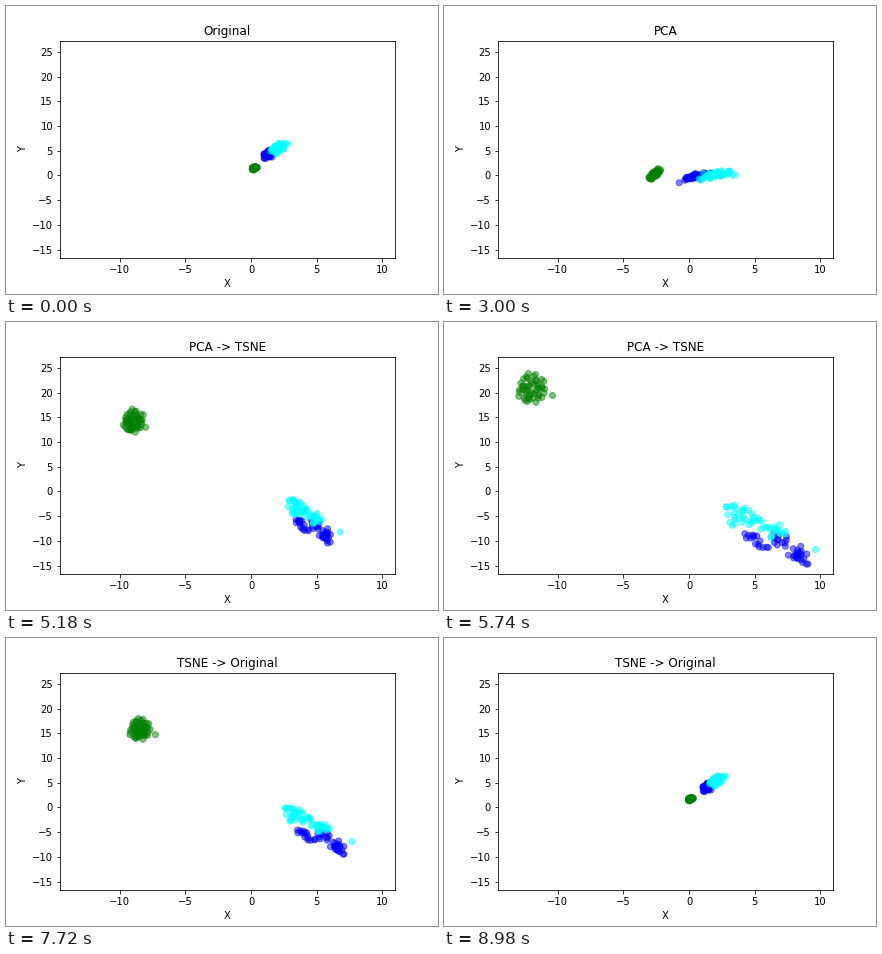
Write a matplotlib script that moves like this. It is 432x288 px and loops after 9 s.

```python
import matplotlib.pyplot as plt
import numpy as np
from matplotlib.animation import FuncAnimation

plt.rcParams.update({"font.family": "DejaVu Sans", "font.size": 10,
                     "figure.subplot.bottom": 0.125})

rng = np.random.default_rng(5)
COUNT = 50            # dots per group
HOLD, MOVE = 50, 100  # frames of rest and of travel per stage
X_LIMITS, Y_LIMITS = (-14.55, 10.95), (-16.71, 27.29)
GOLDEN_ANGLE = np.pi * (3 - 5 ** 0.5)


def normal():
    z = rng.normal(size=COUNT)
    return ((z - z.mean()) / z.std()).clip(-2.2, 2.2)


def mix(a, b, share):
    """Normal variable correlated with a by the given share."""
    return share * a + (1 - share ** 2) ** 0.5 * b


def rank(values):
    return np.argsort(np.argsort(values))


def even_disc():
    """Unit disc filled evenly, slightly jittered, listed from bottom to top."""
    i = np.arange(COUNT)
    radius = np.sqrt((i + 0.5) / COUNT)
    spots = np.column_stack([radius * np.cos(i * GOLDEN_ANGLE),
                             radius * np.sin(i * GOLDEN_ANGLE)])
    spots += rng.normal(0, 0.1, spots.shape)
    return spots[np.argsort(spots[:, 1])]


def trail(size, lift, path, widths, stray):
    """Discs strung along a path from the largest item to the smallest."""
    share = rank(-size) / (COUNT - 1)
    at = np.linspace(0, 1, len(path))
    middle = np.column_stack([np.interp(share, at, axis) for axis in zip(*path)])
    width = np.interp(share, [0, 1], widths)[:, None]
    places = middle + even_disc()[rank(lift)] * width * [1, 2.7]
    places[np.argmin(size)] = stray
    return places.clip(*np.transpose([X_LIMITS, Y_LIMITS]))


def make_group(raw, raw_spread, flat, flat_spread, path, widths, stray):
    """The same items in the three layouts, tied together by size and lift."""
    size, lift = normal(), normal()
    raw_xy = np.column_stack([mix(size, normal(), 0.5), mix(size, normal(), 0.9)])
    flat_xy = np.column_stack([size, mix(size, lift, 0.65)])
    return (np.round(raw + raw_xy * raw_spread, 1),
            flat + flat_xy * flat_spread,
            trail(size, lift, path, widths, stray))


groups = [
    make_group(raw=(0.25, 1.46), raw_spread=(0.1, 0.17),
               flat=(-2.64, 0.19), flat_spread=(0.21, 0.48),
               path=[(-13.36, 23.8)], widths=(1.25, 1.25), stray=(-11.5, 22.4)),
    make_group(raw=(1.33, 4.26), raw_spread=(0.2, 0.46),
               flat=(0.5, -0.25), flat_spread=(0.57, 0.4),
               path=[(4.9, -10.3), (6.1, -12), (7.8, -11.2),
                     (9.2, -13.9), (9.5, -14.6), (10.2, -15.7)],
               widths=(0.45, 0.8), stray=(10.4, -16.7)),
    make_group(raw=(2.03, 5.55), raw_spread=(0.26, 0.54),
               flat=(2.1, 0.14), flat_spread=(0.65, 0.45),
               path=[(3.5, -4.7), (3.7, -5.1), (4.9, -6.4), (6.8, -9.5), (8.4, -8.7)],
               widths=(1.1, 0.4), stray=(10.95, -13.4)),
]
layouts = [np.vstack(parts) for parts in zip(*groups)]
names = ["Original", "PCA", "TSNE"]

fig, ax = plt.subplots(figsize=(6, 4), dpi=72)
dots = ax.scatter(*layouts[0].T, alpha=0.5,
                  c=np.repeat(["green", "blue", "cyan"], COUNT))
ax.set(xlim=X_LIMITS, ylim=Y_LIMITS, xlabel="X", ylabel="Y")
title = ax.set_title(names[0])


def update(frame):
    stage, step = divmod(frame, HOLD + MOVE)
    following = (stage + 1) % len(names)
    start, end = layouts[stage], layouts[following]
    dots.set_offsets(start + (end - start) * max(step - HOLD, 0) / MOVE)
    title.set_text(names[stage] if step < HOLD
                   else f"{names[stage]} -> {names[following]}")
    return dots, title


anim = FuncAnimation(fig, update, frames=len(names) * (HOLD + MOVE),
                     interval=20, repeat=True, repeat_delay=0, blit=False)
plt.show()
```
